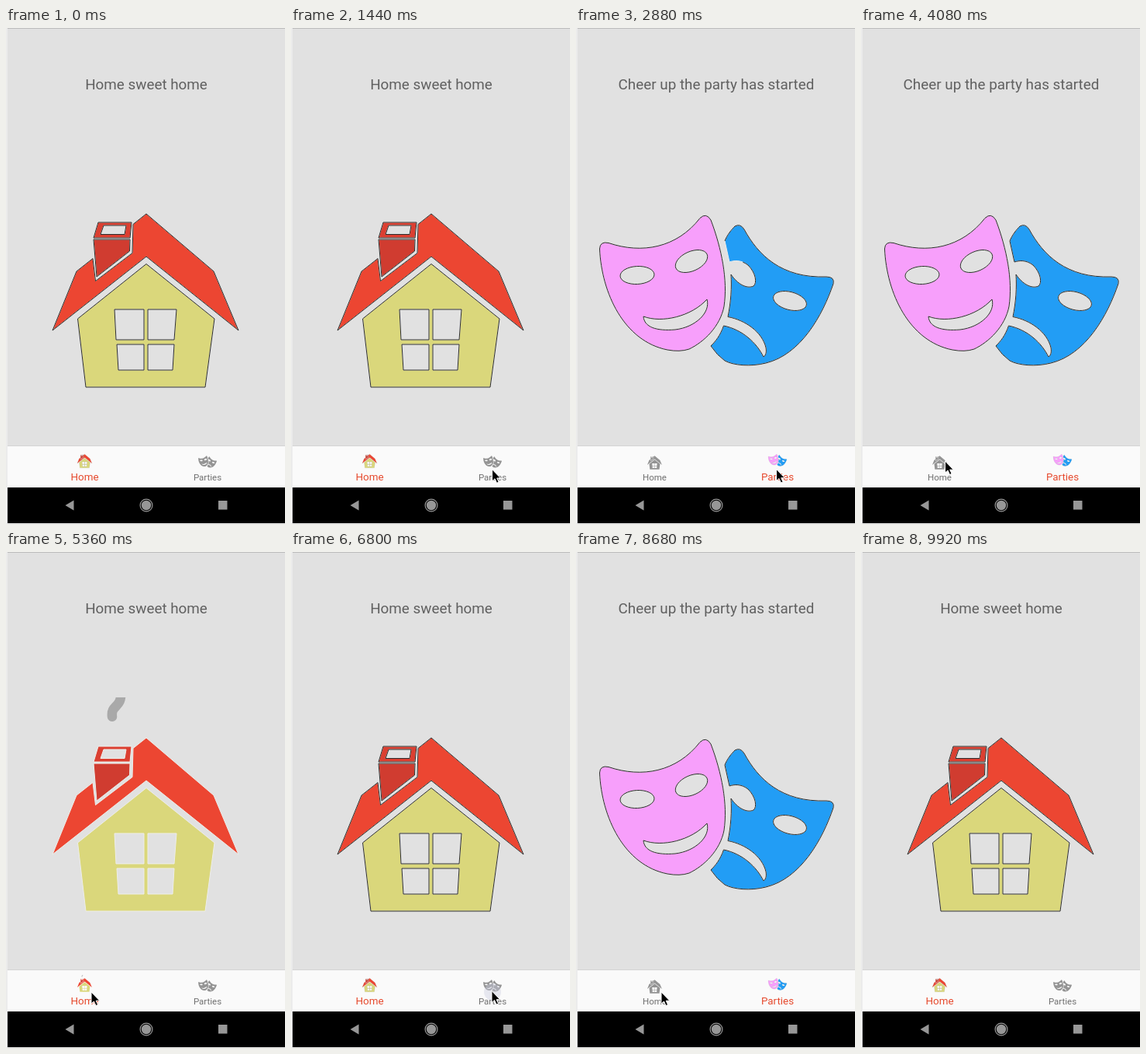
These frames come from a looping animation (360x638 px, 9960 ms). An HTML page:

```html
<!DOCTYPE html>
<html lang="en">
<head>
<meta charset="utf-8">
<title>Home and parties</title>
<style>
  html, body { margin: 0; width: 100%; height: 100%; overflow: hidden; background: #e1e1e1; }
  svg { display: block; width: 100%; height: 100%; }
  text { font-family: Roboto, sans-serif; text-anchor: middle; }
  .shape { fill-rule: evenodd; stroke: var(--edge, #eeeeea); stroke-width: 1; }
  .line { fill: none; stroke: var(--line, #2c2c2c); stroke-width: 1; }
  .streamer { fill: none; stroke-width: 12; stroke-linecap: round; stroke-linejoin: round; }
  .roof { fill: var(--fill, #ec4632); }
  .top { fill: var(--fill, #db3f31); }
  .stack { fill: var(--fill, #d03c30); }
  .wall { fill: var(--fill, #dad77b); }
  .joy { fill: var(--fill, #f79ffb); }
  .gloom { fill: var(--fill, #229df5); }
  .grey { --fill: #949494; --edge: none; --line: none; }
</style>
</head>
<body>
<svg viewBox="0 0 360 638">
  <defs>
    <clipPath id="view"><rect x="29" y="187" width="304" height="302"/></clipPath>
    <clipPath id="flue"><rect x="100" y="187" width="90" height="73"/></clipPath>
    <clipPath id="bar"><rect x="2" y="538" width="358" height="53"/></clipPath>
    <g id="house">
      <g clip-path="url(#flue)">
        <path id="smoke" fill="none" stroke="#a9a9a9" stroke-width="12.5" stroke-linecap="round"
          d="M148 180C150 201 135 196 137 212"/>
      </g>
    </g>
    <g id="masks"><g id="streamers" clip-path="url(#view)"></g></g>
  </defs>

  <rect width="360" height="638" fill="#e1e1e1"/>
  <rect width="360" height="1" fill="#bcbcbc"/>
  <text id="title" x="181" y="79" font-size="18.85" fill="#606060"></text>
  <use id="picture"/>

  <rect y="537" width="360" height="1" fill="#d4d4d4"/>
  <rect y="538" width="360" height="53" fill="#fafafa"/>
  <g id="tabs"></g>
  <g clip-path="url(#bar)"><circle id="ripple" cy="566" fill="#c9cde0"/></g>

  <rect y="591" width="360" height="46" fill="#000"/>
  <rect y="637" width="360" height="1" fill="#f0f0f0"/>
  <rect width="2" height="638" fill="#ebebeb"/>
  <g fill="#979797">
    <path d="M76.5 614L87.5 607.5V620.5Z"/>
    <circle cx="181" cy="614" r="6.2"/>
    <circle cx="181" cy="614" r="7.9" fill="none" stroke="#979797" stroke-width="1.2"/>
    <rect x="274" y="608" width="11.5" height="11.5"/>
  </g>
  <path id="cursor" d="M0 0V15L3.5 12L6 17.5L8.6 16.4L6.2 11.2H10.8Z" fill="#000" stroke="#fff" stroke-width="1"/>
</svg>
<script>
const LOOP = 9960;
const $ = id => document.getElementById(id);

function add(parent, tag, attrs) {
  const el = document.createElementNS('http://www.w3.org/2000/svg', tag);
  for (const k in attrs) el.setAttribute(k, attrs[k]);
  return parent.appendChild(el);
}

const clamp = v => Math.max(0, Math.min(1, v));
const ease = v => v * v * (3 - 2 * v);
const mix = (a, b, p) => a + (b - a) * p;

// An ellipse as a closed sub-path, so it can cut a hole
const oval = (x, y, rx, ry, deg) => {
  const a = deg * Math.PI / 180, dx = rx * Math.cos(a), dy = rx * Math.sin(a);
  const arc = `A${rx} ${ry} ${deg} 1 1 `;
  return `M${x - dx} ${y - dy}${arc}${x + dx} ${y + dy}${arc}${x - dx} ${y - dy}Z`;
};

const shapes = {
  house: {
    roof: 'M181 239L268 313L300 389L181 294L60 389L91 313L112 296.5L115.5 325.5L163 289.5L164 252.5Z',
    top: 'M119 250H162L160 270H113ZM126 254H155L153 265.5H122Z',
    stack: 'M113 272H160L159.5 287L117 320Z',
    wall: 'M181 303.5L269 374L257 462H103L92.5 374Z' +
      'M140 362H178V401H142ZM183 362H220L217 401H183Z' +
      'M143 407H178V440H145ZM183 407H217L215 440H183Z'
  },
  masks: {
    joy: 'M30.5 284Q31 274 42 276.5C85 291 130 283 160 244.5Q168 237 174 247' +
      'C188 284 196 324 191 358C186 384 165 404 146 413Q134 417 118 414C62 403 33 341 30.5 284Z' +
      oval(79, 318, 22, 11.5, -3) + oval(149, 300, 22, 12.5, -24) +
      'M87 371C111 380 149 371 169 349C174 366 154 385 128 388C104 390 88 385 87 371Z',
    gloom: 'M192 274C195 266 201 259 205 255Q212 251 217 259C235 292 265 322 323 320Q334 320 332 329' +
      'C318 370 290 420 245 431C225 436 203 434 192 428Q182 421 174 409C180 403 186 396 190.5 383' +
      'C215 388 233 405 242 423C245 421 246 417 245 411C240 391 219 376 196 371.5' +
      'C200 352 201 334 200 317C208 329 220 336 229 332C234 328 232 315 222 305' +
      'C213 298 204 299 198 301Z' + oval(276, 351, 22, 11.5, 15)
  }
};

const wave = 'M0 0C2 10 13 15 11 27S0 40 6 58';
const hook = 'M0 0C-3 12 -14 20 -10 32S0 50 6 58';
const streamers = [
  [252, 207, '#d0d680', wave], [98, 321, '#ff8a00', hook], [184, 434, '#a65cba', wave]
].map(([x, y, stroke, d]) => ({
  x, y, el: add($('streamers'), 'path', { class: 'streamer', stroke, d })
}));

const lines = [];
for (const id in shapes) {
  for (const name in shapes[id]) {
    const d = shapes[id][name];
    add($(id), 'path', { d, class: 'shape ' + name });
    lines.push(add($(id), 'path', { d, class: 'line', pathLength: 1 }));
  }
}

const tabs = [
  { art: 'house', x: 101.5, label: 'Home', title: 'Home sweet home' },
  { art: 'masks', x: 260, label: 'Parties', title: 'Cheer up the party has started' }
];
for (const tab of tabs) {
  tab.icon = add($('tabs'), 'use', { href: '#' + tab.art });
  tab.text = add($('tabs'), 'text', { x: tab.x });
  tab.text.textContent = tab.label;
}

// [time, tab]: the moment each screen opens
const screens = [[-3000, 0], [2040, 1], [4920, 0], [6960, 1], [8920, 0]];

// [time, x, y] of the pointer tip
const pointer = [
  [400, 310, 603], [1000, 286, 575], [1500, 258.5, 567.5], [3200, 258.5, 567.5],
  [3950, 108.5, 557], [4400, 108.5, 557], [4700, 110, 566], [5700, 110, 566],
  [6400, 259, 564.5], [7200, 259, 564.5], [7850, 160, 513.5], [8050, 160, 513.5],
  [8600, 110, 566], [9600, 110, 566]
];

function drawPicture(t) {
  const [start, index] = screens.findLast(s => s[0] <= t);
  const age = t - start, tab = tabs[index];
  $('picture').setAttribute('href', '#' + tab.art);
  if ($('title').textContent !== tab.title) $('title').textContent = tab.title;

  const drawn = clamp((age - 450) / 480);
  for (const line of lines) line.setAttribute('stroke-dasharray', `${drawn * 1.01} 2`);

  $('smoke').setAttribute('transform', `translate(0 ${(440 - age) * .14})`);
  $('smoke').style.display = index === 0 && age < 760 ? '' : 'none';
  for (const s of streamers) {
    s.el.setAttribute('transform', `translate(${s.x} ${s.y - (age - 120) * .6})`);
    s.el.style.display = index === 1 && age < 800 ? '' : 'none';
  }
}

function drawTabs(t) {
  const lead = 50;
  const [start, index] = screens.findLast(s => s[0] - lead <= t);
  const p = ease(clamp((t - start + lead) / 110));
  tabs.forEach((tab, i) => {
    const on = i === index, k = on ? p : 1 - p;
    tab.icon.setAttribute('class', on ? '' : 'grey');
    tab.icon.setAttribute('transform',
      `translate(${tab.x} ${mix(558, 556, k)}) scale(.079) translate(-181 -338)`);
    tab.text.setAttribute('y', mix(582, 581.6, k));
    tab.text.setAttribute('font-size', mix(11.5, 13.4, k));
    tab.text.setAttribute('fill', on ? '#e64a2e' : '#707070');
  });

  const tap = screens.find(s => t >= s[0] - 220 && t < s[0] + 120);
  $('ripple').style.display = tap ? '' : 'none';
  if (tap) {
    const q = (t - tap[0] + 220) / 340;
    $('ripple').setAttribute('cx', tabs[tap[1]].x);
    $('ripple').setAttribute('r', mix(5, 38, q));
    $('ripple').setAttribute('opacity', .5 * (1 - q));
  }
}

function drawPointer(t) {
  const i = pointer.findIndex(p => p[0] > t);
  $('cursor').style.display = i > 0 ? '' : 'none';
  if (i < 1) return;
  const a = pointer[i - 1], b = pointer[i];
  const p = ease((t - a[0]) / (b[0] - a[0]));
  $('cursor').setAttribute('transform', `translate(${mix(a[1], b[1], p)} ${mix(a[2], b[2], p)})`);
}

const origin = performance.now();
function frame() {
  const t = (performance.now() - origin) % LOOP;
  drawPicture(t);
  drawTabs(t);
  drawPointer(t);
  requestAnimationFrame(frame);
}
frame();
</script>
</body>
</html>
```
